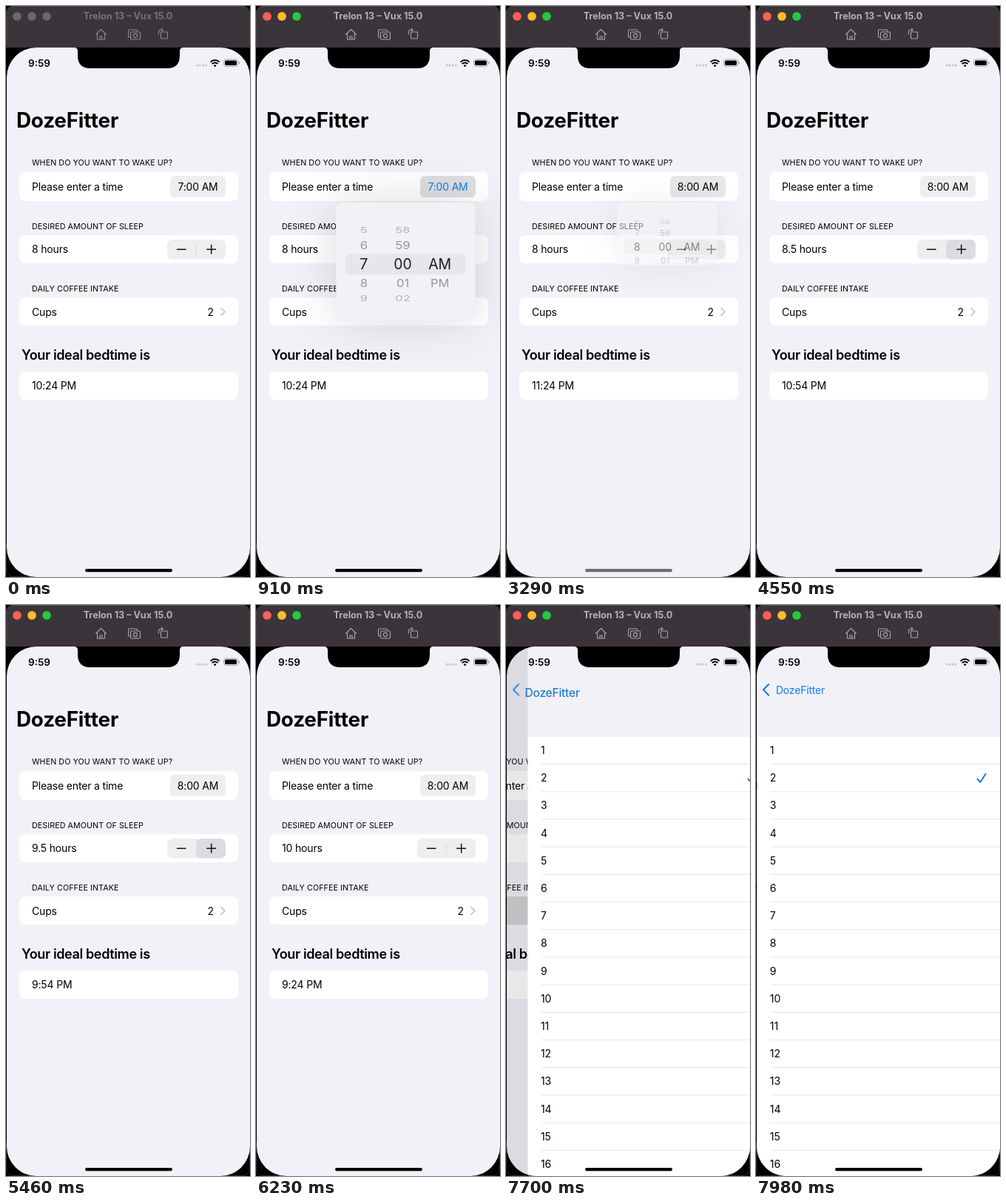
An HTML page that plays this animation: 330x770 px, repeating every 8 s.

```html
<!DOCTYPE html>
<html lang="en">
<head>
<meta charset="utf-8">
<title>Bedtime planner</title>
<style>
html, body { margin: 0; width: 100%; height: 100%; overflow: hidden; background: #000; }
svg { display: block; width: 330px; height: 770px; }
text { font-family: Inter, Roboto, sans-serif; white-space: pre; }
.row { font-size: 14px; letter-spacing: -.17px; }
.head { font-size: 10.7px; letter-spacing: .08px; }
.mid { text-anchor: middle; }
.line { fill: none; stroke-linecap: round; stroke-linejoin: round; }
.light { stroke: rgba(0, 0, 0, .14); stroke-width: 1; }
</style>
</head>
<body>
<svg id="stage" viewBox="0 0 330 770" xmlns="http://www.w3.org/2000/svg"></svg>
<script>
const LOOP = 8000, STEP = 70;
const BLUE = [20, 124, 229], BLUE_CSS = `rgb(${BLUE})`;
const BAND_Y = 351.5, WHEEL_R = 62.7, WHEEL_STEP = 25 * Math.PI / 180;
const ROW_GAP = 37.2;

const clamp = v => Math.max(0, Math.min(1, v));
const mix = (a, b, k) => a + (b - a) * k;

// Critically damped spring from 0 to 1
function spring(ms, omega) {
  const u = Math.max(0, ms) / 1000 * omega;
  return 1 - (1 + u) * Math.exp(-u);
}

const text = (x, y, str, attrs = 'class="row"') => `<text x="${x}" y="${y}" ${attrs}>${str}</text>`;
const rect = (x, y, w, h, r, fill, attrs = '') =>
  `<rect x="${x}" y="${y}" width="${w}" height="${h}" rx="${r}" fill="${fill}" ${attrs}/>`;
const line = (d, color, width, attrs = '') =>
  `<path class="line" d="${d}" stroke="${color}" stroke-width="${width}" ${attrs}/>`;
const range = n => Array.from({ length: n }, (_, i) => i);

const wheels = [
  { x: 141, first: -4, items: ['3', '4', '5', '6', '7', '8', '9', '10', '11', '12'] },
  { x: 196, first: -2, items: ['58', '59', '00', '01', '02'] },
  { x: 248.3, first: 0, items: ['AM', 'PM'] }
];

const wheelLayer = (size, cls) => wheels.map((w, n) => w.items.map((s, i) =>
  `<text class="mid ${cls}" data-col="${n}" data-i="${w.first + i}" y="${size * .36}" font-size="${size}" fill="#1d1d1f">${s}</text>`
).join('')).join('');

const toolbar = `
  <path d="M1 56V9a9 9 0 0 1 9-9H320a9 9 0 0 1 9 9V56z" fill="#3b353b"/>
  <path d="M.5 56V9A8.5 8.5 0 0 1 9 .5H321A8.5 8.5 0 0 1 329.5 9V56" fill="none" stroke="#5c565c" stroke-width=".7"/>
  ${[15, 35, 55].map(x => `<circle class="light" cx="${x}" cy="14" r="6"/>`).join('')}
  ${text(165, 18, 'Trelon 13 – Vux 15.0', 'id="device" class="mid" font-size="12.6" font-weight="700"')}
  <g id="tools" class="line" stroke="#a9a4a9" stroke-width="1.1">
    <path d="M121.5 38.5L128.5 31.5L135.5 38.5M123.5 37.5V45H133.5V37.5M127 45V41H130V45"/>
    <path d="M167.5 42H166.5Q165.5 42 165.5 41V33Q165.5 32 166.5 32H176.5Q177.5 32 177.5 33V34"/>
    <rect x="168.5" y="35" width="13" height="10" rx="1.5"/><circle cx="175" cy="40" r="2.6"/>
    <rect x="209.5" y="35" width="9" height="9" rx="1"/>
    <path d="M206.5 38V35Q206.5 32.2 209.5 32.2H212M210.2 30.3L212.2 32.2L210.2 34.1"/>
  </g>`;

const form = `
  ${rect(-10, 56, 450, 714, 0, '#f2f1f7')}
  ${text(35, 215, 'WHEN DO YOU WANT TO WAKE UP?', 'class="head"')}
  ${text(35, 301, 'DESIRED AMOUNT OF SLEEP', 'class="head"')}
  ${text(35, 385, 'DAILY COFFEE INTAKE', 'class="head"')}
  ${rect(18, 224, 296, 39, 8, '#fff')}
  ${rect(18, 309, 296, 38, 8, '#fff')}
  ${rect(18, 393, 296, 38, 8, '#fff', 'id="cups"')}
  ${rect(18, 493, 296, 38, 8, '#fff')}
  ${text(35, 249, 'Please enter a time')}
  ${rect(222, 229, 75, 29, 6, '#eeeef0', 'id="timeBox"')}
  ${text(259.5, 249, '', 'id="time" class="row mid"')}
  ${text(35, 333, '', 'id="sleep" class="row"')}
  ${rect(218, 315, 79, 26.5, 7, '#eeeef0')}
  ${line('M257.5 322V335', '#d6d6da', 1)}
  ${rect(257, 315, 40, 26.5, 7, '#dcdce0', 'id="plus"')}
  ${line('M231.5 328.2H243M271.8 328.2H283.6M277.7 322.3V334.1', '#111', 1.5)}
  ${text(35, 417.5, 'Cups')}
  ${text(272.5, 417.5, '2')}
  ${line('M291 407.5L296 412.3L291 417.1', '#c3c3c7', 1.7)}
  ${text(21, 476.5, 'Your ideal bedtime is', 'font-size="18" font-weight="600" letter-spacing="-.37"')}
  ${text(35, 517, '', 'id="bed" class="row"')}`;

const popup = `
  <g id="popup">
    <rect class="pane" x="102" y="265" width="196" rx="10" fill="#f2f1f5" style="filter:drop-shadow(0 0 34px rgba(0,0,0,.14))"/>
    <g clip-path="url(#paneClip)">
      ${rect(115, 337, 169, 29.5, 6, '#e7e6ea')}
      <g clip-path="url(#offBand)">${wheelLayer(17.3, 'dim')}</g>
      <g clip-path="url(#onBand)">${wheelLayer(20.3, 'sharp')}</g>
    </g>
  </g>`;

const list = `
  <g id="list">
    ${rect(1, 56, 330, 123, 0, '#f2f1f7')}
    ${rect(1, 178, 330, 592, 0, '#fff')}
    ${range(16).map(i => text(18.5, 201 + i * ROW_GAP, i + 1) +
      rect(19, 214 + i * ROW_GAP, 312, 1, 0, '#e6e6e9')).join('')}
    ${line('M299 234.5L303 239L310.3 227.5', BLUE_CSS, 1.9)}
  </g>`;

const statusBar = `
  <path d="M92 56Q97 56 97 61V67Q97 84 114 84H218Q235 84 235 67V61Q235 56 240 56z"/>
  ${text(30, 82, '9:59', 'font-size="13.5" font-weight="600"')}
  ${range(4).map(i => `<circle cx="${258.3 + i * 4}" cy="80" r="1.5" fill="#c5c5c9"/>`).join('')}
  <path d="M276.5 75.6a8.6 8.6 0 0 1 12.2 0M278.7 78.1a5.4 5.4 0 0 1 7.8 0" fill="none" stroke="#000" stroke-width="1.9"/>
  <path d="M280.7 80.2l1.9 2 1.9-2a2.7 2.7 0 0 0-3.8 0z"/>
  <rect x="294.5" y="72" width="19" height="9.5" rx="3" fill="none" stroke="#a5a5a9"/>
  ${rect(296, 73.5, 16, 6.5, 1.8, '#000')}
  ${rect(314.7, 75, 1.3, 3.5, .6, '#a5a5a9')}`;

const stage = document.getElementById('stage');
stage.innerHTML = `
  <defs>
    <clipPath id="screen"><rect x="1" y="56" width="329" height="714" rx="40"/></clipPath>
    <clipPath id="paneClip"><rect class="pane" x="102" y="265" width="196" rx="10"/></clipPath>
    <clipPath id="onBand"><rect x="115" y="337" width="169" height="29.5"/></clipPath>
    <clipPath id="offBand"><path clip-rule="evenodd" d="M102 265H298V438H102zM115 337V366.5H284V337z"/></clipPath>
  </defs>
  ${rect(0, 0, 330, 770, 0, '#000')}
  <path d="M.5 724V761A8.5 8.5 0 0 0 9 769.5H321A8.5 8.5 0 0 0 329.5 761V724" fill="none" stroke="#3c3c3e" stroke-width=".7"/>
  ${toolbar}
  <g clip-path="url(#screen)">
    <g id="form">${form}</g>
    ${rect(0, 56, 330, 714, 0, '#000', 'id="shade"')}
    ${popup}
    ${list}
    <text id="title">DozeFitter</text>
    ${line('M17 107L10 114.3L17 121.6', BLUE_CSS, 2.2, 'id="back"')}
    ${statusBar}
    ${rect(107, 759, 118, 4.2, 2.1, '#000', 'id="home"')}
  </g>`;

const el = id => document.getElementById(id);
const set = (node, attrs) => { for (const k in attrs) node.setAttribute(k, attrs[k]); };
const lights = [...stage.querySelectorAll('.light')];
const panes = [...stage.querySelectorAll('.pane')];
const digits = [...stage.querySelectorAll('[data-i]')];

// Press and release times of the plus button
const taps = [[4270, 4690], [4970, 5250], [5390, 5600], [5880, 6160]];

function plusPress(t) {
  return Math.max(...taps.map(([down, up]) =>
    Math.min(clamp((t - down + 70) / 140), 1 - clamp((t - up + 70) / 140))));
}

function clockText(minutes) {
  const h = Math.floor(minutes / 60), m = minutes % 60;
  return `${h}:${String(m).padStart(2, '0')} PM`;
}

function hourShift(t) {
  if (t < 2100) return 0;
  if (t < 2450) return .35 + .37 * clamp((t - 2100) / 210);
  return mix(.72, 1, spring(t - 2400, 14));
}

function drawPopup(t) {
  const shown = t >= 490 && t < 3360, closing = t >= 3290;
  el('popup').style.display = shown ? '' : 'none';
  const open = closing ? .557 : spring(t - 455, 10);
  const scale = mix(.3, 1, open);
  set(el('popup'), {
    transform: `translate(258 265) scale(${scale}) translate(-258 -265)`,
    opacity: closing ? .5 : clamp(open * 1.6)
  });
  panes.forEach(p => set(p, { height: mix(60, 173, open) }));

  const shifts = [hourShift(t), 0, 0];
  digits.forEach(d => {
    const { col, i } = d.dataset;
    const a = (i - shifts[col]) * WHEEL_STEP, c = Math.cos(a);
    set(d, {
      transform: `translate(${wheels[col].x} ${BAND_Y + WHEEL_R * Math.sin(a)}) scale(1 ${c})`,
      opacity: Math.abs(a) > 1.22 ? 0 : d.classList.contains('dim') ? .47 * c : 1
    });
  });

  const press = !shown ? 0 : closing ? .5 : clamp((t - 420) / 210);
  set(el('timeBox'), { fill: `rgb(${[238, 238, 240].map(v => v - 15 * press)})` });
  set(el('time'), { fill: press === 1 ? BLUE_CSS : '#000' });
}

function drawPush(t) {
  const p = spring(t - 7475, 18.1), q = Math.pow(p, 1.24);
  set(el('form'), { transform: `translate(${-.3 * 329 * p} 0)` });
  set(el('shade'), { opacity: .1 * p });
  set(el('list'), { transform: `translate(${329 * (1 - p)} 0)` });
  set(el('title'), {
    x: mix(14, 27, q), y: mix(164, 119.5, q),
    'font-size': mix(27.8, 14, q),
    'font-weight': Math.round(mix(700, 400, q * q)),
    'letter-spacing': -.2,
    fill: `rgb(${BLUE.map(v => Math.round(v * p))})`,
    opacity: 1 - p * (1 - p)
  });
  set(el('back'), { opacity: clamp((p - .6) / .4) });
}

function draw(ms) {
  const t = Math.floor(ms / STEP) * STEP;
  const active = t >= 350, later = t >= 2800;
  const steps = taps.filter(([down]) => t >= down + STEP).length;

  const colors = active ? ['#ff5f57', '#febc2e', '#28c840'] : Array(3).fill('#6c676c');
  lights.forEach((l, i) => set(l, { fill: colors[i] }));
  set(el('device'), { fill: active ? '#b5b0b5' : '#777277' });
  set(el('tools'), { opacity: active ? 1 : .75 });

  el('time').textContent = later ? '8:00 AM' : '7:00 AM';
  el('sleep').textContent = `${8 + steps / 2} hours`;
  el('bed').textContent = clockText(624 + (later ? 60 : 0) - 30 * steps);
  set(el('plus'), { opacity: plusPress(t) });
  set(el('cups'), { fill: t >= 7210 ? '#d3d3d5' : '#fff' });
  set(el('home'), { fill: t >= 3290 && t < 3850 ? '#6f6f73' : '#000' });

  drawPopup(t);
  drawPush(t);
}

const start = performance.now();
function tick() {
  draw((performance.now() - start) % LOOP);
  requestAnimationFrame(tick);
}
tick();
</script>
</body>
</html>
```
